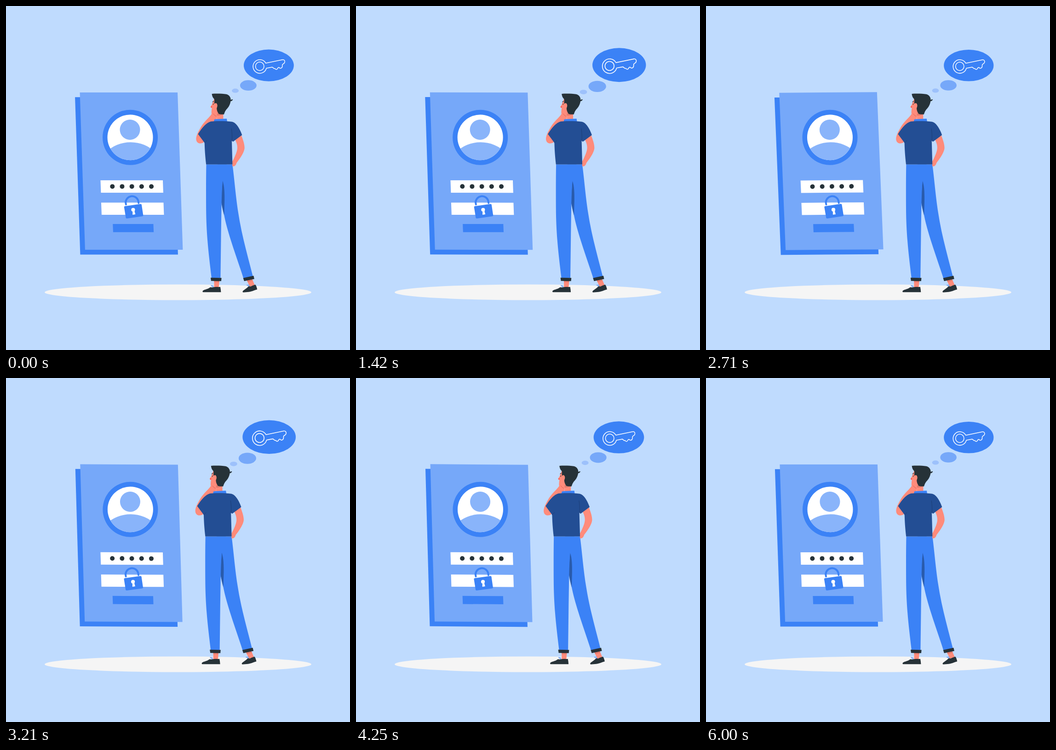
Animation of 748x748 px, one loop 6040 ms. Source, as an HTML page:

```html
<!DOCTYPE html>
<html lang="en">
<head>
<meta charset="utf-8">
<title>Forgotten password</title>
<style>
  html, body { margin: 0; width: 100%; height: 100%; overflow: hidden; background: #bfdbfe; }
  svg { display: block; width: 100vw; height: 100vh; }
  .blue { fill: #3b82f6; }
  .soft { fill: #76a8f9; }
  .pale { fill: #89b4fa; }
  .white { fill: #fff; }
  .dark { fill: #263238; }
  .skin { fill: #ff8b7b; }
  .navy { fill: #234e94; }
  .shade { fill: #295bac; }
  .line { fill: none; stroke-linecap: round; stroke-linejoin: round; }
</style>
</head>
<body>
<svg viewBox="0 0 748 748">
  <defs>
    <clipPath id="portrait"><circle cx="270" cy="285.7" r="49.5"/></clipPath>
  </defs>
  <ellipse cx="374" cy="622.5" rx="290" ry="17" fill="#f5f5f5"/>

  <g id="panel">
    <path class="blue" d="M150 198.3H362.5L374 540.5H161.5Z"/>
    <path class="soft" d="M160.5 188H373L384.5 530H172Z"/>
    <circle class="blue" cx="270" cy="285.7" r="60"/>
    <circle class="white" cx="270" cy="285.7" r="49.5"/>
    <g class="pale" clip-path="url(#portrait)">
      <circle cx="269.5" cy="269" r="22"/>
      <circle cx="271" cy="373.7" r="77.5"/>
    </g>
    <path class="white" d="M205.5 379H341L342 406H206.5ZM207 427.5H342.5L343.5 454H208Z"/>
    <g id="dots" class="dark"></g>
    <path class="blue" d="M232.3 474H320.5L321.2 491.7H233Z"/>
    <path class="line" d="M261 431.5L260.2 427.5A14 14 0 0 1 287.6 423.5L288.3 428.5" stroke="#3b82f6" stroke-width="4"/>
    <path class="blue" d="M258.5 435.3L292.5 430.4Q294.5 430.2 294.9 432L298.4 455Q298.6 457 296.6 457.3L263 462Q261 462.2 260.6 460.3L256.9 437.5Q256.6 435.6 258.5 435.3Z"/>
    <circle class="white" cx="276.5" cy="443" r="4.1"/>
    <path class="white" d="M275.3 444.5L279 444L281.3 453L275.3 453.9Z"/>
  </g>

  <g id="man">
    <!-- legs -->
    <path class="skin" d="M452.6 596H464L462.8 612H452.6ZM523.5 596L535 593L541 607L530 610Z"/>
    <path d="M452.6 597.5H464L463.7 600.5H452.6ZM524.2 597.5L535.5 594.5L536.7 597L525.3 600Z" fill="#e07a6c"/>
    <path class="blue" d="M460 344.5H492.5C497 380 500 420 506 455C513 500 526 545 537 588.5L516.5 592.5C503 550 482 495 474 453L468 400Z"/>
    <path class="shade" d="M471 380C475 391 475.5 408 475.2 425L474.4 455C471.5 445 469.5 435 467.5 424Z"/>
    <path class="blue" d="M435.5 344.5H480L471 380C469.3 400 468.8 425 468.4 450C467.5 500 467.2 545 466.5 591.5H447C441.5 545 435.5 500 435.2 440C435 405 435 375 435.5 344.5Z"/>
    <path class="dark" d="M445 590.8L468.7 591.3L468 598.2L446 597.8ZM515.7 591.4L538.4 586.4L540 593.4L518 598.2Z"/>
    <!-- shoes -->
    <path class="line" d="M450.5 612L446 607.5L451 608.5ZM529 610L523.5 607L528.5 606.5Z" stroke="#76a8f9" stroke-width="1.4"/>
    <path class="dark" d="M427.6 620C429 616.5 438 616.5 443.5 612C446 610.5 447.5 612.8 451 611.5C456 610.2 461 611.3 466 610.7Q467.2 616 467.5 622.3H428.5Q427 622 427.6 620Z"/>
    <path class="dark" d="M514.6 620.4C517 617 523 615 526.5 610.3C529 608.8 530 610.4 533 609.4C536 608 539 606.6 542.5 606C544.5 609 545.5 612.5 546.3 616.2C540 617.8 533 621.8 525 622L516 622.7Q514 622.3 514.6 620.4Z"/>
    <!-- arms -->
    <path class="skin" d="M447 235C442 243 432 250 424.5 262C418 273 413 283 413.5 290C414 297 420 300.5 427 298C432 296 436 290 437 285L434 272L457 247L459 238Z"/>
    <path class="skin" d="M498 290C503 300 504.5 308 501.5 317C499 325 495 333 492 338.5L492.3 348.5C497 349.5 500 346.5 501.5 341C508 333 518 319 518.8 309C519 300 515 290 511.5 280Z"/>
    <!-- head -->
    <path class="skin" d="M455 198C451.5 203 449.5 210 448.3 213L444.7 219.5Q445.5 221.5 447.8 221.6C447 227 446 233 448 237C450 241 455 242 459 240V249H472.5V230L475 205Z"/>
    <path d="M445.2 218.5L448 217.5L447.8 221.6Q445.4 221.5 445.2 218.5Z" fill="#ff5652"/>
    <path d="M459 233L472.5 234C468 238 463 239 459 238Z" fill="#e07a6c"/>
    <path class="dark" d="M447.6 191C455 190.3 470 190.3 479 191.8C486 193.5 488.8 199 488.8 204.3Q491 202.7 493.4 203C492.8 205.4 491 206.8 488.5 207C487.8 212 485.5 218 481.5 222.5C477 227 475.5 231 474.2 235.5Q468 236.5 462.5 234.5C459.5 230 458 226 458.2 221L457 211L453.4 213C452.4 208 453.8 205 452.8 202.2C450 200 448.2 196 447.6 191Z"/>
    <ellipse class="skin" cx="455.6" cy="217.6" rx="4" ry="6.4" transform="rotate(10 455.6 217.6)"/>
    <path class="line" d="M450.6 212.4V214.2M449.4 208.6L451.5 207.2" stroke="#263238" stroke-width="1.2"/>
    <path class="line" d="M451 234.5C453 237.5 455 239 457.5 240" stroke="#e06055" stroke-width="1"/>
    <!-- shirt -->
    <path class="blue" d="M453 246.3Q466 245 480 244.9L481 251.5H452Z"/>
    <path class="skin" d="M454.5 241L458.8 240V245.2L453.6 246.8Z"/>
    <path class="navy" d="M446 251C458 249.8 476 250 492 251.7C501 254 508.5 267 513.4 280.5L493.5 295.3L491 292.5L492.5 344.6H435.2C433 325 432.2 312 431.8 297.6L417.6 278.4C425 267 434 254 446 251Z"/>
    <path class="line" d="M432 297.5L437 292.5M491.4 293C492 284 491.5 276 490.4 267" stroke="#1c3f78" stroke-width="1"/>
  </g>

  <g id="thought">
    <ellipse class="blue" cx="571.3" cy="129.2" rx="54.1" ry="34.3"/>
    <ellipse class="soft" cx="527.1" cy="172.5" rx="17.8" ry="11.3"/>
    <ellipse cx="499" cy="183.9" rx="7.4" ry="4.6" fill="#9dc1fb"/>
    <g class="line" stroke="#fff" stroke-width="1.5">
      <circle cx="551.8" cy="131.2" r="9.2"/>
      <path d="M564.8 124.4L601 117C605 116.3 606.8 120 605.5 123C604.5 125.5 601.5 126 600.8 127.5C600 129.5 601.5 132 599.5 134C598 135.6 595.8 136 594.8 134.8C593.8 133.5 592.2 133 591.2 134.5C590.2 136 589.8 137.8 587.8 138C585.5 138.3 585.8 135.5 583.5 136C581.5 136.5 581 133.2 578.5 133L566.2 135.3A14.7 14.7 0 1 1 564.8 124.4"/>
    </g>
  </g>
</svg>
<script>
  const LOOP = 6040, STEPS = 145;
  const byId = id => document.getElementById(id);
  const [panel, man, thought] = ["panel", "man", "thought"].map(byId);

  byId("dots").innerHTML = Array.from({ length: 5 }, (_, i) =>
    `<circle cx="${231.3 + i * 21.2}" cy="392.4" r="5"/>`).join("");

  // Keyframes are [phase, value] pairs, joined by straight lines.
  const SWAY = [[0, 0], [.25, 1], [.75, -1], [1, 0]];
  const BEAT = [[0, 1], [.1, 1.1], [.3, 1], [.4, 1], [.5, 1.1], [.6, 1], [1, 1]];
  const SHAKE = [0, -1, 2, -4, 4, -4, 4, -4, 2, -1, 0].map((x, i) => [i / 10, x * 1.496]);

  function track(keys, phase) {
    const next = Math.max(1, keys.findIndex(([p]) => p >= phase));
    const [p0, v0] = keys[next - 1], [p1, v1] = keys[next];
    return v0 + (v1 - v0) * (phase - p0) / (p1 - p0);
  }

  function draw(ms) {
    // The picture advances about 24 times a second.
    const step = Math.floor(ms % LOOP / LOOP * STEPS);
    const whole = (step + .5) / STEPS;
    const half = whole * 2 % 1;
    panel.setAttribute("transform", `rotate(${track(SWAY, half)} 267.3 364.3)`);
    man.setAttribute("transform", `translate(${track(SHAKE, whole)} 0)`);
    thought.setAttribute("transform",
      `translate(558.5 141.7) scale(${track(BEAT, half)}) translate(-558.5 -141.7)`);
  }

  const start = performance.now();
  function tick() {
    draw(performance.now() - start);
    requestAnimationFrame(tick);
  }
  tick();
</script>
</body>
</html>
```
